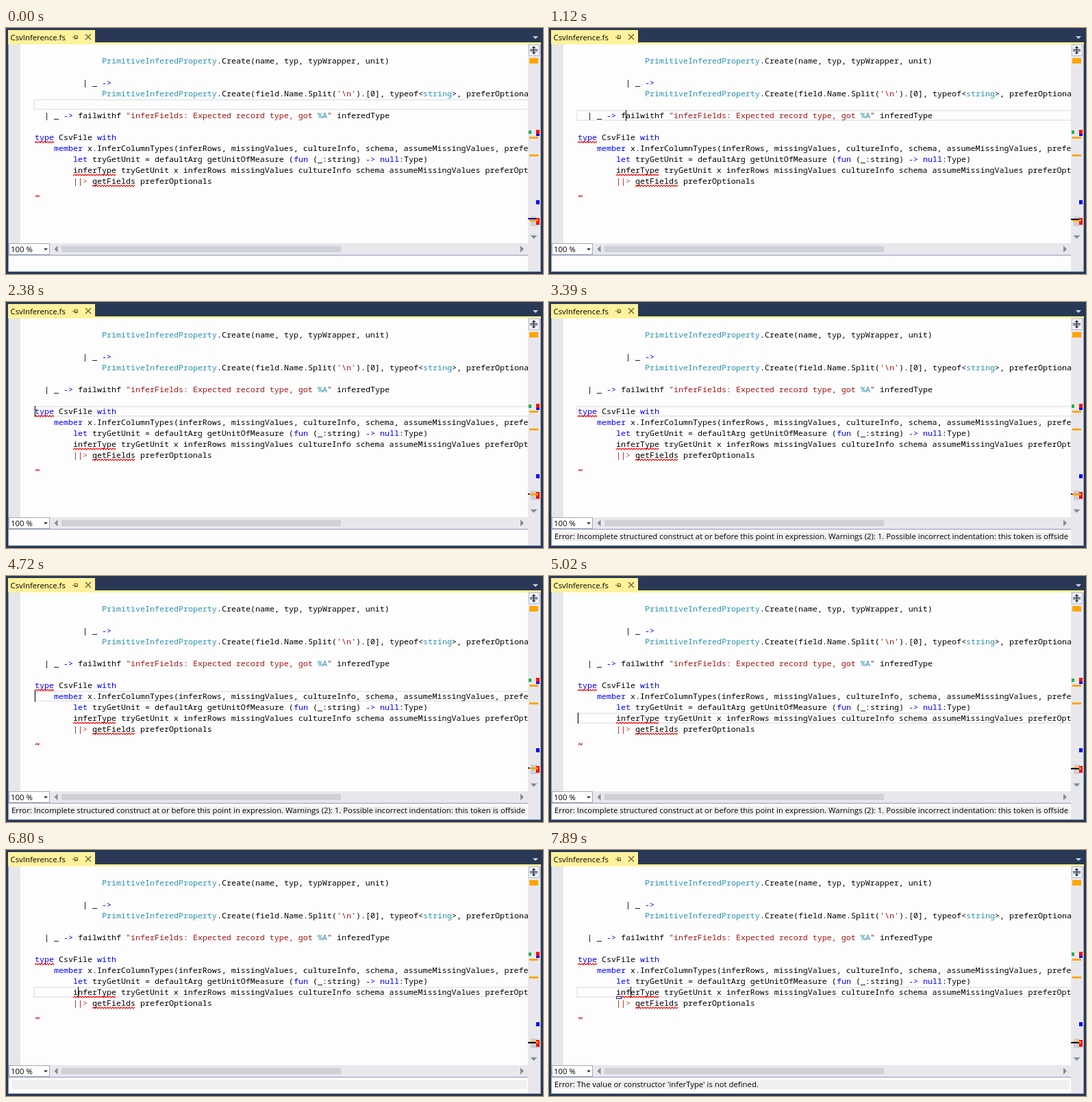
Animation of 784 by 360 pixels, one loop 8 s. Source, as an HTML page with a canvas:

```html
<!DOCTYPE html>
<html lang="en">
<head>
<meta charset="utf-8">
<style>
html, body { margin: 0; width: 100%; height: 100%; overflow: hidden; background: #293955; }
canvas { display: block; width: 784px; height: 360px; }
</style>
</head>
<body>
<canvas id="stage" width="784" height="360"></canvas>
<script>
const ctx = document.getElementById('stage').getContext('2d');
const LOOP = 8000, CELL = 7, ROW = 16, LEFT = 42;
// A 0.6 em advance makes each cell exactly 7 px wide.
const CODE_FONT = `${CELL / 0.6}px "Noto Sans Mono", monospace`;
const UI_FONT = '11.35px "Open Sans", sans-serif';
const BLACK = '#000', BLUE = '#0000ff', TEAL = '#2b91af', RED = '#a31515';

// Each line: vertical centre, first column, then [text, colour] pieces.
const lines = [
  [48, 14, ['PrimitiveInferedProperty', TEAL], ['.Create(name, typ, typWrapper, unit)']],
  [80, 10, ['| _ '], ['->', BLUE]],
  [96, 14, ['PrimitiveInferedProperty', TEAL], ['.Create(field.Name.Split('], ["'\\n'", RED],
    [').[0], typeof<'], ['string', TEAL], ['>, preferOptionals']],
  [128, 2, ['| _ '], ['->', BLUE], [' failwithf '], ['"inferFields: Expected record type, got ', RED],
    ['%A', TEAL], ['"', RED], [' inferedType']],
  [160, 0, ['type', BLUE], [' CsvFile '], ['with', BLUE]],
  [176, 4, ['member', BLUE],
    [' x.InferColumnTypes(inferRows, missingValues, cultureInfo, schema, assumeMissingValues, preferOptionals']],
  [192, 8, ['let', BLUE], [' tryGetUnit = defaultArg getUnitOfMeasure ('], ['fun', BLUE], [' (_:string) '],
    ['->', BLUE], [' '], ['null', BLUE], [':Type)']],
  [208, 8, ['inferType tryGetUnit x inferRows missingValues cultureInfo schema assumeMissingValues preferOptionals']],
  [224, 8, ['||', RED], ['>', '#c8452c'], [' getFields preferOptionals']]
];

const INCOMPLETE = 'Error: Incomplete structured construct at or before this point in expression. ' +
  'Warnings (2): 1. Possible incorrect indentation: this token is offside of context';
const UNDEFINED = "Error: The value or constructor 'inferType' is not defined.";

// Caret script: [time, row centre, column, visible]
const caretScript = [
  [0, 112, 10, 0], [310, 112, 10, 1], [870, 112, 10, 0],
  [1120, 128, 10, 1], [1270, 144, 0, 1], [1540, 144, 0, 0],
  [2380, 160, 0, 1], [2530, 160, 0, 0], [2960, 160, 0, 1], [3390, 160, 0, 0], [4010, 160, 0, 1], [4470, 160, 0, 0],
  [4720, 176, 0, 1], [4870, 192, 0, 1], [5020, 208, 0, 1], [5420, 208, 0, 0],
  [5540, 208, 1, 1], [5690, 208, 2, 1], [5840, 208, 3, 1], [5990, 208, 4, 1],
  [6140, 208, 5, 1], [6290, 208, 6, 1], [6410, 208, 7, 1], [6560, 208, 7, 0],
  [6680, 208, 8, 1], [6800, 208, 9, 1], [7500, 208, 9, 0],
  [7650, 208, 9, 1], [7770, 208, 10, 1], [7890, 208, 11, 1]
];
const messageScript = [[0, null], [2530, INCOMPLETE], [5270, ''], [6950, UNDEFINED]];

const current = (script, t) => script.filter(step => step[0] <= t).pop();

function rect(x, y, w, h, color) {
  ctx.fillStyle = color;
  ctx.fillRect(x, y, w, h);
}

function frame(x, y, w, h, color) {
  ctx.strokeStyle = color;
  ctx.lineWidth = 1;
  ctx.strokeRect(x + 0.5, y + 0.5, w - 1, h - 1);
}

function text(str, x, y, color = BLACK, font = UI_FONT) {
  ctx.font = font;
  ctx.fillStyle = color;
  ctx.fillText(str, x, y);
}

function path(points, color, width) {
  ctx.beginPath();
  points.forEach(([x, y]) => ctx.lineTo(x, y));
  if (width) {
    ctx.strokeStyle = color;
    ctx.lineWidth = width;
    ctx.stroke();
  } else {
    ctx.fillStyle = color;
    ctx.fill();
  }
}

// Solid triangle with its tip pointing along (dx, dy).
function arrow(x, y, dx, dy, size, color) {
  const tip = [x + dx * size / 2, y + dy * size / 2];
  const bx = x - dx * size / 2, by = y - dy * size / 2;
  path([tip, [bx + dy * size, by + dx * size], [bx - dy * size, by - dx * size]], color);
}

function squiggle(x, y, width) {
  const points = [];
  for (let i = 0; i <= width; i += 2) points.push([x + i, y + (i % 4 ? -1 : 1)]);
  path(points, '#ff0000', 1.1);
}

function clipped(x, y, w, h, draw) {
  ctx.save();
  ctx.beginPath();
  ctx.rect(x, y, w, h);
  ctx.clip();
  draw();
  ctx.restore();
}

function drawWindow() {
  rect(0, 0, 784, 360, '#293955');
  rect(3, 24, 778, 333, '#8e9bbc');
  rect(3, 3, 127, 18, '#fff29d');
  rect(3, 21, 778, 3, '#fff29d');
  text('CsvInference.fs', 6.5, 17.5);
  const ink = '#75633d';
  rect(97, 13, 3, 1, ink);
  rect(100, 10, 1, 7, ink);
  frame(100, 11, 5, 5, ink);
  rect(101, 14, 4, 1, ink);
  path([[116, 9], [124, 17]], ink, 1.5);
  path([[124, 9], [116, 17]], ink, 1.5);
  arrow(773, 14, 0, 1, 4, '#ced4dd');
}

function drawCode(row, col, visible) {
  rect(4, 24, 758, 291, '#fdfdfd');
  rect(4, 24, 17, 291, '#e6e7e8');
  clipped(21, 24, 741, 291, () => {
    ctx.strokeStyle = '#eaeaf2';
    ctx.lineWidth = 2;
    ctx.strokeRect(41, row - 7, 740, ROW - 2);
    for (const [y, start, ...pieces] of lines) {
      let x = LEFT + start * CELL;
      for (const [str, color] of pieces) {
        text(str, x, y + 4, color, CODE_FONT);
        x += str.length * CELL;
      }
    }
    squiggle(42, 167, 28);
    squiggle(98, 215, 63);
    squiggle(126, 231, 63);
    squiggle(43, 246, 7);
    if (visible) rect(LEFT + col * CELL, row - 8, 1, ROW, BLACK);
  });
}

function drawOverview(row) {
  rect(762, 24, 18, 332, '#e8e8ec');
  rect(763, 24, 16, 17, '#f1f3f8');
  frame(763, 24, 16, 17, '#b8bdcb');
  rect(765, 31, 11, 1, '#1b293e');
  rect(765, 33, 11, 1, '#1b293e');
  rect(770, 27, 1, 11, '#1b293e');
  arrow(770.5, 28, 0, -1, 3, '#1b293e');
  arrow(770.5, 37, 0, 1, 3, '#1b293e');
  rect(766, 276, 9, 14, '#cdced4');
  const orange = '#ffa500', red = '#ff0000';
  rect(764, 44, 13, 8, orange);
  rect(763, 150, 4, 5, '#22b14c');
  rect(774, 149, 5, 6, red);
  rect(774, 155, 5, 3, BLUE);
  rect(764, 159, 13, 3, orange);
  rect(764, 185, 13, 3, orange);
  rect(774, 252, 5, 6, BLUE);
  rect(774, 278, 5, 10, red);
  // The caret mark passes behind the orange one while the caret is mid-file.
  const markY = row < 128 ? 278 : row < 144 ? 279 : row < 192 ? 280 : 281;
  const drawMark = () => rect(762, markY, 12, 2, markY === 278 || markY === 280 ? '#0000cd' : BLACK);
  if (markY === 280) drawMark();
  rect(764, 280, 13, 3, orange);
  if (markY !== 280) drawMark();
  arrow(770.5, 306, 0, 1, 5, '#868999');
}

function drawScrollbar() {
  rect(4, 315, 776, 17, '#e8e8ec');
  rect(4, 315, 60, 17, '#fff');
  frame(4, 315, 60, 17, '#a4a9b8');
  text('100 %', 7, 328);
  arrow(58, 324, 0, 1, 3, '#1b293e');
  arrow(73, 323.5, -1, 0, 5, '#868999');
  arrow(753.5, 323.5, 1, 0, 5, '#868999');
  rect(81, 319, 408, 9, '#d0d1d7');
}

function drawMessage(message) {
  rect(4, 333, 758, 23, '#fdfdfd');
  if (message === null) return;
  rect(9, 337, 751, 13, '#f0f0f0');
  clipped(8, 335, 751, 17, () => text(message, 8, 347));
}

function drawSmartTag() {
  rect(98, 214, 8, 4, '#fdfdfd');
  frame(98, 214, 8, 4, '#2020b0');
}

function render(t) {
  const [, row, col, visible] = current(caretScript, t);
  const [, message] = current(messageScript, t);
  drawWindow();
  drawCode(row, col, visible);
  if (message === UNDEFINED) drawSmartTag();
  drawOverview(row);
  drawScrollbar();
  drawMessage(message);
}

const start = performance.now();
function tick() {
  render((performance.now() - start) % LOOP);
  requestAnimationFrame(tick);
}
tick();
</script>
</body>
</html>
```
